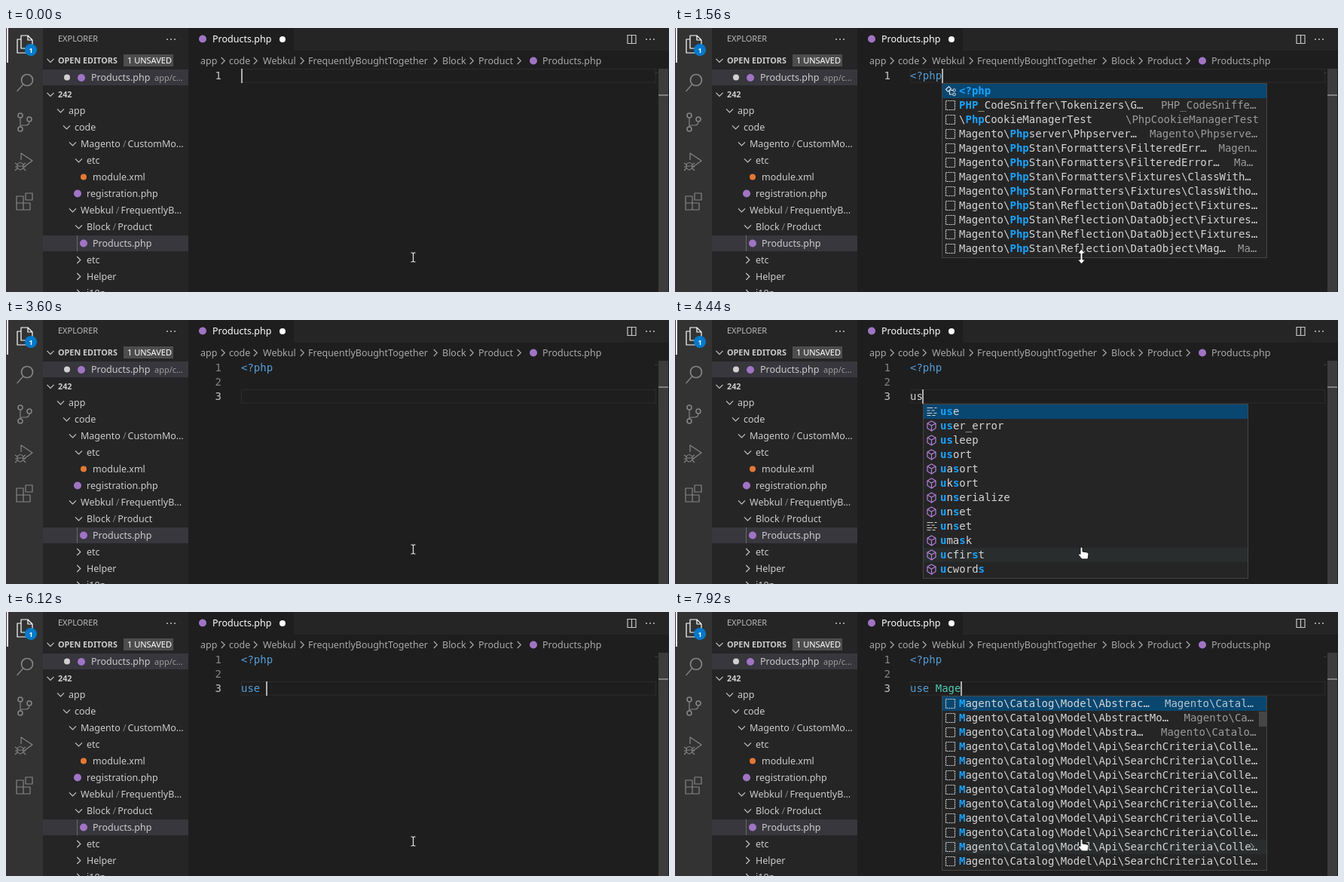
These frames come from a looping animation (880x350 px, 8 s). An HTML page:

```html
<!DOCTYPE html>
<html lang="en">
<head>
<meta charset="utf-8">
<title>Editor typing</title>
<style>
html, body { margin: 0; width: 100%; height: 100%; overflow: hidden; background: #1e1e1e; }
svg { display: block; width: 880px; height: 350px; }
text { white-space: pre; font: 12.5px "Noto Sans", sans-serif; fill: #cccccc; }
text.mono { font: 14px "DejaVu Sans Mono", monospace; fill: #d4d4d4; }
text.small { font-size: 11px; }
text.bold { font-weight: 700; font-size: 10.8px; }
.match { font-weight: 700; fill: #18a3ff; }
.line { fill: none; stroke-width: 1.2; }
</style>
</head>
<body>
<svg id="stage" viewBox="0 0 880 350" xmlns="http://www.w3.org/2000/svg"></svg>
<script>
const LOOP = 8000, STEP = 120, CHAR = 8.43, ROW = 19;
const TEXT_X = 312, FIRST_ROW = 54;
const BLUE = '#569cd6', TEAL = '#4ec9b0', GREY = '#d4d4d4', PURPLE = '#a074c4';

const escapeText = s => s.replace(/&/g, '&amp;').replace(/</g, '&lt;');
const rect = (x, y, w, h, fill, more = '') =>
  `<rect x="${x}" y="${y}" width="${w}" height="${h}" fill="${fill}" ${more}/>`;
const circle = (x, y, r, fill, more = '') => `<circle cx="${x}" cy="${y}" r="${r}" fill="${fill}" ${more}/>`;
const path = (d, stroke, more = '') => `<path class="line" d="${d}" stroke="${stroke}" ${more}/>`;
const label = (x, y, s, fill = '#cccccc', cls = '') =>
  `<text x="${x}" y="${y}" class="${cls}" style="fill:${fill}">${escapeText(s)}</text>`;
const mono = (x, y, s, fill = GREY) => label(x, y, s, fill, 'mono');
const chevron = (x, y, open, stroke = '#c5c5c5') =>
  path(open ? `M${x - 4.5} ${y - 2.2}l4.5 4.5 4.5-4.5` : `M${x - 2.2} ${y - 4.5}l4.5 4.5-4.5 4.5`, stroke);
const dots = (x, y) => [-5, 0, 5].map(d => circle(x + d, y, 1, '#c5c5c5')).join('');
const fileIcon = (x, y, fill = PURPLE) => circle(x, y, 5, fill);

function activityBar() {
  const dim = 'stroke-width="1.6" stroke-linejoin="round"';
  const grey = '#858585';
  return rect(0, 0, 49, 350, '#333333') + rect(0, 0, 1, 350, '#4a2545') + rect(1, 0, 2, 46, '#ffffff')
    + path('M20 10h9l6 6v11h-15zM29 10v6h6M20 15h-5v18h13v-6', '#ffffff', dim)
    + circle(33, 29, 8, '#007acc')
    + '<text x="33" y="32.5" text-anchor="middle" style="font-size:9px;font-weight:700;fill:#fff">1</text>'
    + circle(28, 69, 7.5, 'none', `stroke="${grey}" stroke-width="1.7"`) + path('M22.5 75l-8 9', grey, 'stroke-width="2"')
    + [[19, 116], [19, 134], [31, 121]].map(([x, y]) =>
        circle(x, y, 3, 'none', `stroke="${grey}" stroke-width="1.6"`)).join('')
    + path('M19 119v12M31 124q0 5-5 5h-4q-3 0-3 2', grey, dim)
    + path('M20 175v-9l15 10-11 8', grey, dim)
    + path('M15 181q4-5 8 0v4q-4 6-8 0zM15 183h8M12 179l3 2M12 184h3M12 189l3-3M26 179l-3 2M26 184h-3M26 189l-3-3', grey)
    + path('M14 223h9v9h9v9h-18zM14 232h9v9M26 219h9v9h-9z', grey, dim);
}

function treeRow([indent, kind, first, second], k) {
  const y = 109.5 + 22 * k, base = 114 + 22 * k;
  const x = 83 + indent * 8;
  const icon = kind === 'php' ? fileIcon(x - 12, y)
    : kind === 'xml' ? circle(x - 12, y, 4, '#e37933')
    : chevron(x - 10.5, y, kind === 'open');
  const tail = second ? `<tspan dx="3" fill-opacity=".55">/</tspan><tspan dx="2">${second}</tspan>` : '';
  return icon + `<text x="${x}" y="${base}">${first}${tail}</text>`;
}

function sidebar() {
  const rows = [
    [0, 'open', 'app'], [1, 'open', 'code'], [2, 'open', 'Magento', 'CustomMo…'], [3, 'open', 'etc'],
    [4, 'xml', 'module.xml'], [3, 'php', 'registration.php'], [2, 'open', 'Webkul', 'FrequentlyB…'],
    [3, 'open', 'Block', 'Product'], [4, 'php', 'Products.php'],
    [3, 'shut', 'etc'], [3, 'shut', 'Helper'], [3, 'shut', 'i18n']
  ];
  return rect(49, 0, 193, 350, '#252526')
    + label(69, 18, 'EXPLORER', '#bbbbbb', 'small') + dots(219, 15)
    + chevron(59, 43, true) + label(69, 47, 'OPEN EDITORS', '#cccccc', 'bold')
    + rect(156, 35, 66, 16, '#4d4d4d') + label(161, 47, '1 UNSAVED', '#ffffff', 'small')
    + rect(49, 55, 193, 21, '#37373d') + circle(81, 65.5, 4, '#d0d0d0') + fileIcon(100, 66)
    + label(113, 70, 'Products.php') + label(197, 70, 'app/c…', '#9d9d9d', 'small')
    + chevron(59, 88, true) + label(69, 92, '242', '#cccccc', 'bold')
    + rect(49, 275, 193, 21, '#37373d') + rect(94, 275, 1, 21, '#6a6a6a')
    + rows.map(treeRow).join('');
}

function editorFrame() {
  const crumbs = [[258, 'app', 288], [296, 'code', 331], [341, 'Webkul', 393],
    [401, 'FrequentlyBoughtTogether', 570], [579, 'Block', 618], [627, 'Product', 681]];
  return rect(242, 0, 638, 350, '#1e1e1e') + rect(382, 0, 498, 30, '#252526')
    + fileIcon(261, 14.5) + label(274, 19, 'Products.php', '#ffffff') + circle(367, 15, 4, '#ffffff')
    + path('M825 9.5h11v11h-11zM830.5 9.5v11', '#c5c5c5') + dots(855, 15)
    + crumbs.map(([x, s, sep]) => label(x, 48, s, '#a9a9a9') + chevron(sep, 43.5, false, '#a9a9a9')).join('')
    + fileIcon(700, 43.5) + label(712, 48, 'Products.php', '#a9a9a9')
    + rect(861, 59, 4, 1, '#3a3a3a')
    + rect(866, 54, 13, 296, '#3c3c3c') + rect(866, 88, 13, 2, '#808080');
}

// Moments at which the document changes; the caret restarts its blink on each.
const head = '<?php\n\n';
const edits = [
  [0, ''], [360, '<'], [600, '<?'], [840, '<?p'], [960, '<?ph'], [1080, '<?php'], [1770, '<?php'],
  [2640, '<?php\n'], [2880, head], [4440, head + 'us'], [4680, head + 'use'], [4920, head + 'use '],
  [6480, head + 'use M'], [6960, head + 'use Ma'], [7200, head + 'use Mag'], [7560, head + 'use Mage']
];

const stan = 'Magento\\PhpStan\\', model = 'Magento\\Catalog\\Model\\';
const fixtures = [stan + 'Reflection\\DataObject\\Fixtures…'];
const collection = [model + 'Api\\SearchCriteria\\Colle…'];
const repeat = (n, item) => Array(n).fill(item);

// Items: [label, detail, detail x, icon]
const popups = [
  { from: 1320, to: 1770, x: 354, y: 73, query: 'php', pointer: 'resize', icon: 'box', items: [
    ['<?php', '', 0, 'module'],
    ['PHP_CodeSniffer\\Tokenizers\\G…', 'PHP_CodeSniffe…', 645],
    ['\\PhpCookieManagerTest', '\\PhpCookieManagerTest', 598],
    ['Magento\\Phpserver\\Phpserver…', 'Magento\\Phpserve…', 630],
    [stan + 'Formatters\\FilteredErr…', 'Magen…', 721.5],
    [stan + 'Formatters\\FilteredError…', 'Ma…', 742],
    [stan + 'Formatters\\Fixtures\\ClassWith…'],
    [stan + 'Formatters\\Fixtures\\ClassWitho…'],
    ...repeat(3, fixtures),
    [stan + 'Reflection\\DataObject\\Mag…', 'Ma…', 747]
  ] },
  { from: 4440, to: 4920, x: 329, y: 111, query: 'us', pointer: 'hand', hover: 10, icon: 'cube',
    items: 'use user_error usleep usort uasort uksort unserialize unset unset umask ucfirst ucwords'
      .split(' ').map((s, i) => [s, '', 0, i === 0 || i === 8 ? 'keyword' : 'cube']) },
  { from: 6660, to: LOOP, x: 354, y: 111, query: 'm', pointer: 'hand', hover: 10, icon: 'box', thumb: true, items: [
    [model + 'Abstrac…', 'Magento\\Catal…', 650],
    [model + 'AbstractMo…', 'Magento\\Ca…', 675.5],
    [model + 'Abstra…', 'Magento\\Catalo…', 645],
    ...repeat(9, collection)
  ] }
];

const icons = {
  box: (x, y) => path(`M${x - 6} ${y - 6}h12v12h-12z`, '#d0d0d0', 'stroke-dasharray="2 1"'),
  cube: (x, y) => path(`M${x} ${y - 6.5}l5.5 3v6.5l-5.5 3.5-5.5-3.5v-6.5zM${x - 5.5} ${y - 3.5}l5.5 3 5.5-3M${x} ${y - .5}v7`, '#b180d7'),
  keyword: (x, y) => path(`M${x - 6} ${y - 5}h8M${x + 4} ${y - 5}h3M${x - 6} ${y - 1.5}h4M${x} ${y - 1.5}h4M${x - 6} ${y + 2}h7M${x + 3} ${y + 2}h4M${x - 6} ${y + 5}h5M${x + 1} ${y + 5}h4`, '#d0d0d0'),
  module: (x, y) => path(`M${x - 6} ${y - 2}l4-4 3 3-4 4zM${x} ${y - 1}h4M${x - 1} ${y}v4.5h4`, '#e0e0e0')
    + circle(x + 5, y - 1, 1.8, 'none', 'stroke="#e0e0e0"') + circle(x + 5, y + 4.5, 1.8, 'none', 'stroke="#e0e0e0"')
};

function markMatches(s, query) {
  let found = 0;
  return [...s].map(c => {
    const hit = found < query.length && c.toLowerCase() === query[found];
    if (hit) found++;
    return hit ? `<tspan class="match">${escapeText(c)}</tspan>` : escapeText(c);
  }).join('');
}

function drawPopup(p, t) {
  const { x, y } = p;
  const rows = p.items.map(([name, detail, detailX, icon = p.icon], k) => {
    const top = y + 1 + ROW * k, base = top + 14;
    const back = k === 0 ? '#094771' : k === p.hover ? '#2a2d2e' : '';
    return (back ? rect(x + 1, top, 430, ROW, back) : '')
      + icons[icon](x + 11.5, top + 9.5)
      + `<text class="mono" x="${x + 23}" y="${base}">${markMatches(name, k ? p.query : icon === 'module' ? name : p.query)}</text>`
      + (detail ? mono(detailX, base, detail, k ? '#9a9a9a' : '#b5c4cf') : '');
  }).join('');
  const fade = Math.min(1, (t - p.from) / 180);
  const thumb = p.thumb
    ? rect(x + 421, y + 21, 10, 20, '#797979', `opacity="${.4 * fade}"`) + chevron(766, y + 200, false, '#808080') : '';
  return rect(x + .5, y + .5, 431, 231, '#252526', 'stroke="#454545"') + rows + thumb;
}

const outline = 'stroke="#111" stroke-width="1" stroke-linejoin="round"';
const pointers = {
  beam: '<path d="M537.5 298h2l1 1 1-1h2M540.5 299v10M537.5 310h2l1-1 1 1h2" fill="none" stroke="#e8e8e8" stroke-width="1.2"/>',
  resize: `<path d="M539.5 293l5 6h-3.5v8h3.5l-5 6-5-6h3.5v-8h-3.5z" fill="#fff" ${outline}/>`,
  arrow: `<path d="M538.5 302.500v15.500l3.500-3.500 2.500 6 2.500-1-2.500-6h5z" fill="#fff" ${outline}/>`,
  hand: `<path d="M538 302q1.500-2 3 0v5l6 1q2 .5 2 2.500l-1 6.500h-8l-5-6q0-2 3-.5z" fill="#fff" ${outline}/>`
};

function colourLine(s, row) {
  if (row === 0) return [[s, s === '<' ? GREY : BLUE]];
  return s.startsWith('use') ? [['use', BLUE], [s.slice(3), TEAL]] : [[s, GREY]];
}

function drawDocument(t) {
  const [since, content] = edits.findLast(e => e[0] <= t);
  const lines = content.split('\n'), last = lines.length - 1;
  const top = FIRST_ROW + ROW * last;
  const caretX = TEXT_X + CHAR * lines[last].length;
  const caretOn = (t - since) % 1000 < 500;
  return rect(TEXT_X + .5, top + .5, 550, ROW - 1.5, 'none', 'stroke="#2b2b2b"')
    + lines.map((s, row) => {
      const base = FIRST_ROW + ROW * row + 14;
      const spans = colourLine(s, row).map(([part, fill]) => `<tspan style="fill:${fill}">${escapeText(part)}</tspan>`).join('');
      return mono(277.5, base, String(row + 1), row === last ? '#c6c6c6' : '#858585')
        + `<text class="mono" x="${TEXT_X}" y="${base}">${spans}</text>`;
    }).join('')
    + (caretOn ? rect(Math.floor(caretX), top, 2, ROW, '#aeafad') : '');
}

const stage = document.getElementById('stage');
stage.innerHTML = editorFrame() + sidebar() + activityBar() + '<g id="live"></g>';
const live = document.getElementById('live');
let shown = -1;

function render(now) {
  const t = Math.floor(now % LOOP / STEP) * STEP;
  if (t !== shown) {
    shown = t;
    const popup = popups.find(p => t >= p.from && t < p.to);
    const pointer = popup ? popup.pointer : t >= 4920 && t < 5280 ? 'arrow' : 'beam';
    live.innerHTML = drawDocument(t) + (popup ? drawPopup(popup, t) : '') + pointers[pointer];
  }
}

function tick() {
  render(performance.now());
  requestAnimationFrame(tick);
}
tick();
</script>
</body>
</html>
```
